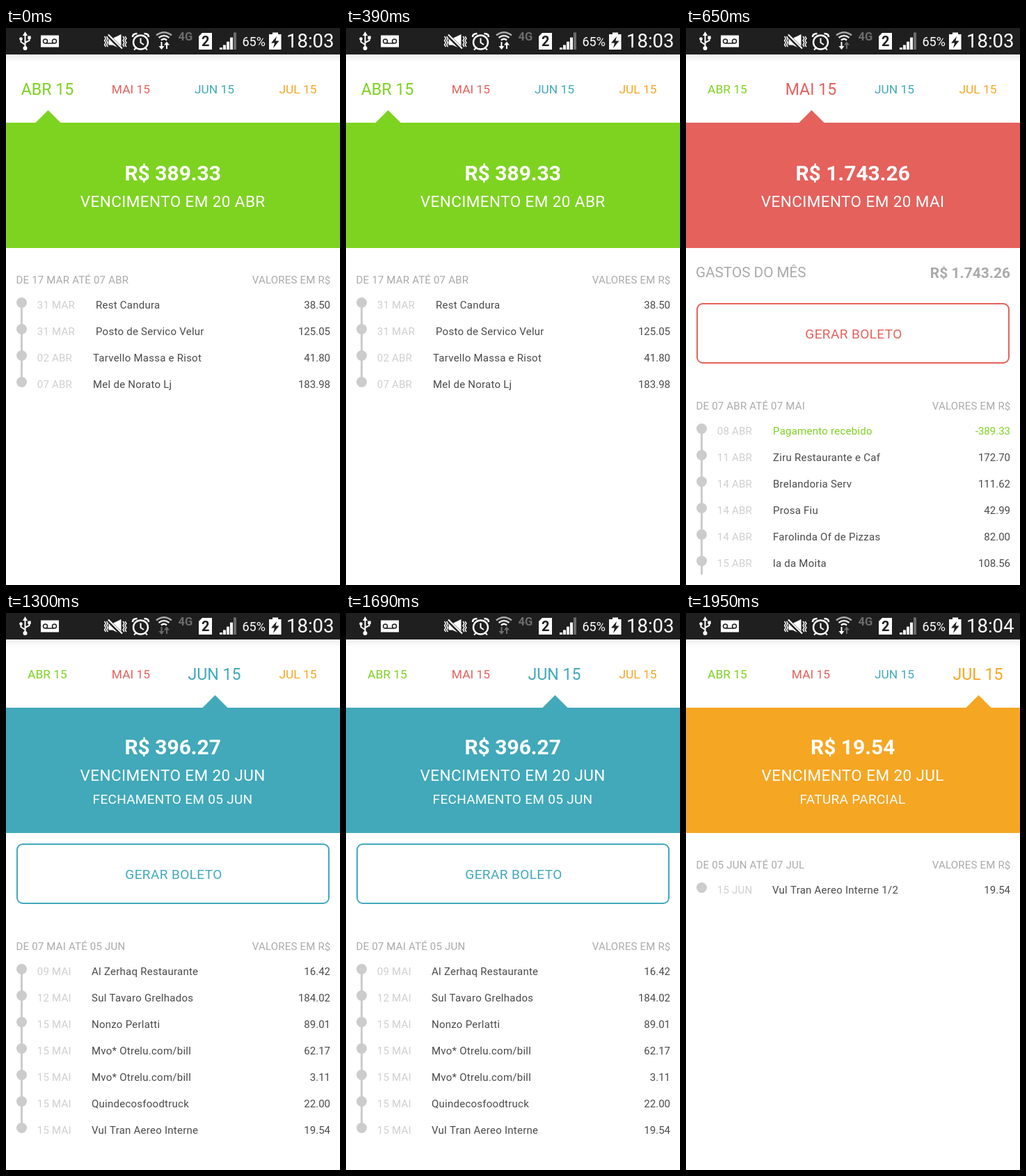
Animation of 480x800 px, one loop 2600 ms. Source, as an HTML page with a canvas:

```html
<!DOCTYPE html>
<html lang="pt">
<head>
<meta charset="utf-8">
<style>
  html, body { margin: 0; width: 100%; height: 100%; overflow: hidden; background: #fff; }
  canvas { display: block; }
</style>
</head>
<body>
<canvas id="stage" width="480" height="800"></canvas>
<script>
const ctx = document.getElementById('stage').getContext('2d');
const HOLD = 650;
const WHITE = '#fff', BAR = '#1f1f1f', DIM = '#6c6c6c';
const HEADING = '#aaa', DATE = '#cfcfcf', DOT = '#ccc', INK = '#4a4a4a';
const GREEN = '#7ed321';

const months = [
  {
    name: 'ABR', color: GREEN, amount: 'R$ 389.33', period: 'DE 17 MAR ATÉ 07 ABR',
    listY: 367, clock: '18:03', arrows: [WHITE, WHITE],
    rows: [
      ['31 MAR', 'Rest Candura', '38.50'],
      ['31 MAR', 'Posto de Servico Velur', '125.05'],
      ['02 ABR', 'Tarvello Massa e Risot', '41.80'],
      ['07 ABR', 'Mel de Norato Lj', '183.98']
    ]
  },
  {
    name: 'MAI', color: '#e5615c', amount: 'R$ 1.743.26', period: 'DE 07 ABR ATÉ 07 MAI',
    listY: 548, clock: '18:03', arrows: [WHITE, DIM], spent: true, buttonY: 396, more: true,
    rows: [
      ['08 ABR', 'Pagamento recebido', '-389.33', GREEN],
      ['11 ABR', 'Ziru Restaurante e Caf', '172.70'],
      ['14 ABR', 'Brelandoria Serv', '111.62'],
      ['14 ABR', 'Prosa Fiu', '42.99'],
      ['14 ABR', 'Farolinda Of de Pizzas', '82.00'],
      ['15 ABR', 'la da Moita', '108.56']
    ]
  },
  {
    name: 'JUN', color: '#41a9ba', amount: 'R$ 396.27', period: 'DE 07 MAI ATÉ 05 JUN',
    listY: 484, clock: '18:03', arrows: [DIM, DIM], note: 'FECHAMENTO EM 05 JUN', buttonY: 332,
    rows: [
      ['09 MAI', 'Al Zerhaq Restaurante', '16.42'],
      ['12 MAI', 'Sul Tavaro Grelhados', '184.02'],
      ['15 MAI', 'Nonzo Perlatti', '89.01'],
      ['15 MAI', 'Mvo* Otrelu.com/bill', '62.17'],
      ['15 MAI', 'Mvo* Otrelu.com/bill', '3.11'],
      ['15 MAI', 'Quindecosfoodtruck', '22.00'],
      ['15 MAI', 'Vul Tran Aereo Interne', '19.54']
    ]
  },
  {
    name: 'JUL', color: '#f5a623', amount: 'R$ 19.54', period: 'DE 05 JUN ATÉ 07 JUL',
    listY: 367, clock: '18:04', arrows: [WHITE, DIM], note: 'FATURA PARCIAL',
    rows: [['15 JUN', 'Vul Tran Aereo Interne 1/2', '19.54']]
  }
];
const nameX = { MAR: 129, ABR: 125, MAI: 123, JUN: 124 };

function text(str, x, y, size, color, { align = 'left', weight = 400, spacing = 0 } = {}) {
  ctx.font = `${weight} ${size}px Roboto, sans-serif`;
  ctx.letterSpacing = spacing + 'px';
  ctx.textAlign = align;
  ctx.fillStyle = color;
  ctx.fillText(str, x, y);
}

function rect(x, y, w, h, color) {
  ctx.fillStyle = color;
  ctx.fillRect(x, y, w, h);
}

function circle(x, y, r, color) {
  ctx.beginPath();
  ctx.arc(x, y, r, 0, 7);
  ctx.fillStyle = color;
  ctx.fill();
}

function polygon(color, ...points) {
  ctx.beginPath();
  points.forEach(([x, y]) => ctx.lineTo(x, y));
  ctx.closePath();
  ctx.fillStyle = color;
  ctx.fill();
}

function stroke(path, width = 2, color = WHITE) {
  ctx.lineWidth = width;
  ctx.strokeStyle = color;
  ctx.stroke(new Path2D(path));
}

function usbIcon() {
  stroke('M27.5 10V28M27.5 24L21.5 20V16M27.5 21L33.5 18V14');
  polygon(WHITE, [27.5, 5], [31, 11], [24, 11]);
  circle(27.5, 29, 3, WHITE);
  circle(21.5, 15.5, 2.3, WHITE);
  rect(31.3, 11.5, 4.4, 4.4, WHITE);
}

function voicemailIcon() {
  rect(50, 10.5, 26, 17, WHITE);
  stroke('M56.5 22H69.5M53.5 19a3 3 0 1 0 6 0a3 3 0 1 0-6 0M66.5 19a3 3 0 1 0 6 0a3 3 0 1 0-6 0', 1.5, BAR);
}

function muteIcon() {
  polygon(WHITE, [147.5, 15], [153, 15], [165.5, 9], [165.5, 30], [153, 24.5], [147.5, 24.5]);
  stroke('M147 11L167 31', 5, BAR);
  stroke('M147 9.5L167 29.5', 2.2);
  for (const x of [141.5, 168]) {
    stroke(`M${x} 12l2 3l-2 3l2 3l-2 3l2 3`, 1.4);
    stroke(`M${x + 3} 12l2 3l-2 3l2 3l-2 3l2 3`, 1.4);
  }
}

function alarmIcon() {
  stroke('M183 20.5a10.5 10 0 1 0 21 0a10.5 10 0 1 0-21 0', 2.4);
  stroke('M193.5 14.5V21L198 24M186.5 29L184 31.5M200.5 29L203 31.5', 2);
  stroke('M182 13Q182 8 188.5 8M205 13Q205 8 198.5 8', 2.6);
}

function wifiIcon([down, up]) {
  stroke('M216 10.5Q227 2 238 10.5', 2.4, '#aaa');
  stroke('M219.5 14Q227 8 234.5 14', 2.4, '#ddd');
  stroke('M223 17.5Q227 14 231 17.5', 2.4);
  stroke('M223.5 20V27', 2, down);
  polygon(down, [219.5, 26], [227.5, 26], [223.5, 31]);
  stroke('M231 24V30', 2, up);
  polygon(up, [227, 24.5], [235, 24.5], [231, 19.5]);
}

function simIcon() {
  polygon(WHITE, [282, 7], [296, 7], [296, 31], [277, 31], [277, 12]);
  text('2', 286.7, 26, 20, BAR, { align: 'center', weight: 700 });
}

function signalIcon() {
  for (let i = 0; i < 5; i++) {
    const h = 3 + i * 3 + i * i * 0.6;
    rect(307 + i * 5, 31 - h, 4, h, i < 4 ? WHITE : DIM);
  }
}

function batteryIcon() {
  rect(383, 6.5, 8, 4, WHITE);
  rect(378, 9, 17.5, 22, WHITE);
  polygon(BAR, [389, 12], [381, 21.5], [386, 21.5], [384, 29], [392.5, 18.5], [387.5, 18.5]);
}

function statusBar(month) {
  rect(0, 0, 480, 38, BAR);
  const shade = ctx.createLinearGradient(0, 38, 0, 49);
  shade.addColorStop(0, 'rgba(0,0,0,.07)');
  shade.addColorStop(1, 'rgba(0,0,0,0)');
  rect(0, 38, 480, 11, shade);
  usbIcon();
  voicemailIcon();
  muteIcon();
  alarmIcon();
  wifiIcon(month.arrows);
  text('4G', 247.5, 17.5, 16.5, DIM, { weight: 700 });
  simIcon();
  signalIcon();
  text('65%', 339.5, 26, 18, WHITE);
  batteryIcon();
  text(month.clock, 471.5, 28, 27.5, WHITE, { align: 'right' });
}

function tabs(active) {
  months.forEach((month, i) => {
    const x = 60 + i * 120, on = i === active;
    text(month.name + ' 15', x - 0.5, on ? 95.5 : 94, on ? 23.2 : 17.4, month.color, { align: 'center' });
    if (on) polygon(month.color, [x + 0.5, 118], [x + 18.5, 136], [x - 17.5, 136]);
  });
}

function banner(month) {
  const y = month.note ? 203 : 219;
  rect(0, 136, 480, 180, month.color);
  text(month.amount, 239.7, y, 30, WHITE, { align: 'center', weight: 700 });
  text(`VENCIMENTO EM 20 ${month.name}`, 239.7, y + 38, 22.5, WHITE, { align: 'center', spacing: 0.4 });
  if (month.note) text(month.note, 239.5, 274, 19, WHITE, { align: 'center', spacing: 0.3 });
}

function button(y, color) {
  ctx.beginPath();
  ctx.roundRect(16, y, 448, 85, 8);
  ctx.lineWidth = 2;
  ctx.strokeStyle = color;
  ctx.stroke();
  text('GERAR BOLETO', 241, y + 50, 19, color, { align: 'center', spacing: 0.4 });
}

function statement({ period, rows, listY, more }) {
  const caps = { spacing: 0.2 }, right = { align: 'right' };
  text(period, 14.5, listY, 15, HEADING, caps);
  text('VALORES EM R$', 466.5, listY, 15, HEADING, { ...caps, ...right });

  const dotY = listY + 27.5;
  const endY = more ? 785 : dotY + (rows.length - 1) * 38;
  rect(21, dotY, 3, endY - dotY, DOT);
  rows.forEach(([date, name, value, color = INK], i) => {
    const y = listY + 36 + i * 38;
    circle(22.5, dotY + i * 38, 7.5, DOT);
    text(date, 44.8, y, 15, DATE, caps);
    text(name, nameX[date.slice(3)], y, 15, color, { spacing: 0.25 });
    text(value, 466, y, 15, color, right);
  });
}

function draw(now) {
  const index = Math.floor(now / HOLD) % months.length;
  const month = months[index];
  rect(0, 0, 480, 800, WHITE);
  statusBar(month);
  tabs(index);
  banner(month);
  if (month.spent) {
    text('GASTOS DO MÊS', 14, 358, 20.7, HEADING);
    text(month.amount, 466, 359, 21, HEADING, { align: 'right', weight: 700 });
  }
  if (month.buttonY) button(month.buttonY, month.color);
  statement(month);
}

const start = performance.now();
function tick() {
  draw(performance.now() - start);
  requestAnimationFrame(tick);
}
tick();
</script>
</body>
</html>
```
